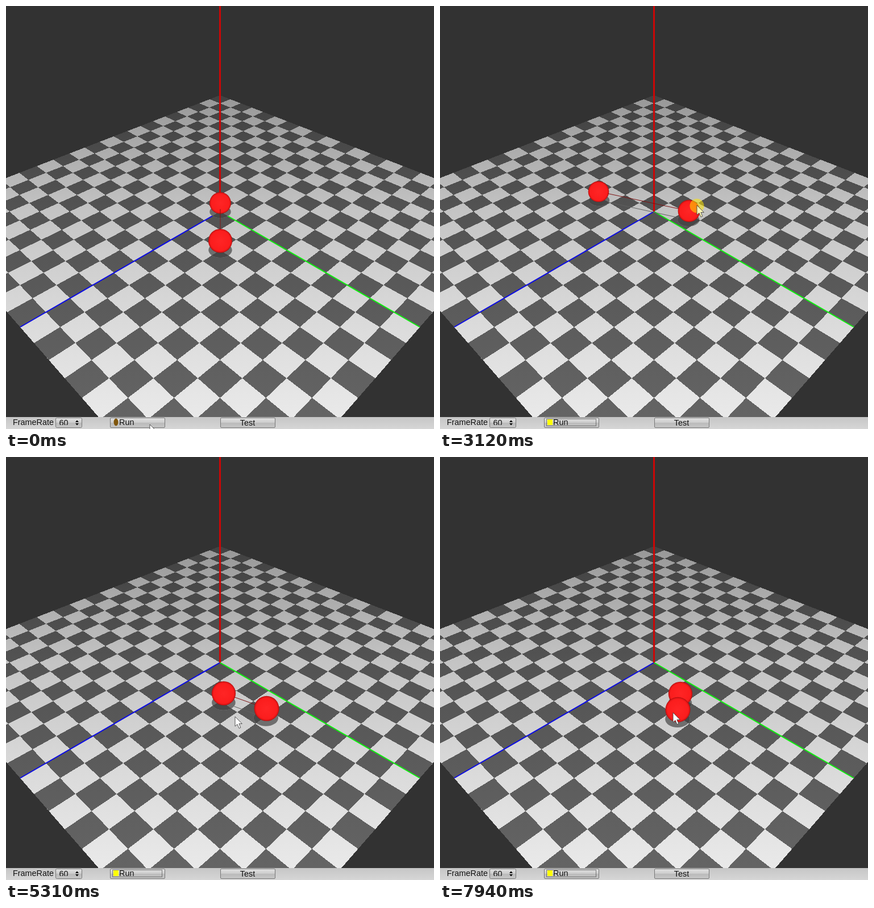
Animation, 753 px wide and 743 px high, one loop 8 s. Source, as an HTML page:

```html
<!DOCTYPE html>
<html lang="en">
<head>
<meta charset="utf-8">
<title>Spring simulation</title>
<style>
  html, body { margin: 0; width: 100%; height: 100%; overflow: hidden; background: #323232; }
  svg { display: block; width: 753px; height: 743px; }
  text { font: 14.4px "Liberation Sans", Arial, sans-serif; fill: #111; }
</style>
</head>
<body>
<svg viewBox="0 0 753 743">
  <defs>
    <linearGradient id="light" gradientUnits="userSpaceOnUse" x1="0" y1="157" x2="0" y2="720">
      <stop offset="0" stop-color="#979797"/><stop offset=".15" stop-color="#aaa"/>
      <stop offset=".36" stop-color="#c4c4c4"/><stop offset=".68" stop-color="#d9d9d9"/>
      <stop offset="1" stop-color="#e9e9e9"/>
    </linearGradient>
    <linearGradient id="dark" gradientUnits="userSpaceOnUse" x1="0" y1="157" x2="0" y2="720">
      <stop offset="0" stop-color="#424242"/><stop offset=".36" stop-color="#535353"/>
      <stop offset="1" stop-color="#646464"/>
    </linearGradient>
    <linearGradient id="bar" x1="0" y1="0" x2="0" y2="1">
      <stop offset="0" stop-color="#c6c6c6"/><stop offset="1" stop-color="#d6d6d6"/>
    </linearGradient>
    <linearGradient id="btn" x1="0" y1="0" x2="0" y2="1">
      <stop offset="0" stop-color="#e0e0e0"/><stop offset=".45" stop-color="#cfcfcf"/>
      <stop offset=".55" stop-color="#bababa"/><stop offset="1" stop-color="#c8c8c8"/>
    </linearGradient>
    <radialGradient id="red">
      <stop offset="0" stop-color="#ff2525"/><stop offset=".82" stop-color="#fb1d1d"/>
      <stop offset=".94" stop-color="#dd1616"/><stop offset="1" stop-color="#a00c0c"/>
    </radialGradient>
    <clipPath id="shade"><ellipse/><ellipse/></clipPath>
    <clipPath id="field"><rect x="88" y="724" width="45" height="12"/></clipPath>
  </defs>

  <rect width="753" height="743" fill="#323232"/>
  <g id="floor" shape-rendering="crispEdges">
    <path id="board" fill="url(#light)"/>
    <path id="squares" fill="url(#dark)"/>
  </g>
  <path id="axisZ" stroke="#0a0ae6" stroke-width="2"/>
  <path id="axisX" stroke="#0ef00e" stroke-width="2"/>
  <g clip-path="url(#shade)">
    <use href="#floor"/>
    <rect width="753" height="743" fill="#414141" opacity=".68"/>
  </g>
  <line id="rodShade" stroke="#606060"/>
  <path d="M376.500 0V361" stroke="#cc0606" stroke-width="3"/>
  <circle id="far" fill="url(#red)"/>
  <line id="rod" stroke="#7c1212"/>
  <circle id="near" fill="url(#red)"/>

  <rect y="722" width="753" height="21" fill="url(#bar)"/>
  <g fill="url(#btn)" stroke="#777">
    <rect x="87.5" y="723.5" width="46" height="17" rx="2"/>
    <rect x="183.5" y="723.5" width="96" height="17" rx="1.5"/>
    <rect x="377.5" y="723.5" width="96" height="17" rx="1.5"/>
  </g>
  <text x="12" y="736">FrameRate</text>
  <text x="93.5" y="737" clip-path="url(#field)">60</text>
  <path d="M122 731L125 727.500L128 731ZM122 733L125 736.500L128 733Z"/>
  <ellipse id="idle" cx="193.5" cy="731" rx="4" ry="6.5" fill="#80560c"/>
  <g id="active">
    <rect x="189" y="726" width="9" height="10" fill="#ff0"/>
    <rect x="187.5" y="725.5" width="87" height="12" fill="none" stroke="#222" stroke-dasharray="1 1"/>
  </g>
  <text x="199" y="736">Run</text>
  <text x="425" y="737" text-anchor="middle">Test</text>

  <circle id="grab" r="12.5" fill="#ffe600" opacity=".55"/>
  <path id="cursor" d="M0 0V17L4 13.500L7 20.500L9.800 19.300L6.900 12.500H12.300Z" stroke="#444" stroke-width=".9"/>
</svg>

<script>
const $ = id => document.getElementById(id);
const LOOP = 8000, CX = 376.5, CY = 361, FOCAL = 871.5, DIST = 23.3, R = 0.5;
const SIN = Math.sqrt(1 / 3), COS = Math.sqrt(2 / 3);
const START = 340, CATCH = 1890, SWING = 3120, FREE = 4050;

// v: right, u: towards the viewer, h: up
function project(v, u, h) {
  const s = FOCAL / (DIST - COS * u - SIN * h);
  return { x: CX + v * s, y: CY + (SIN * u - COS * h) * s, s };
}

// Ground position of a ball whose centre is seen at x, y
function locate([x, y]) {
  const dy = y - CY, depth = DIST - SIN * R;
  const u = (dy * depth + FOCAL * COS * R) / (FOCAL * SIN + COS * dy);
  return [(x - CX) * (depth - COS * u) / FOCAL, u];
}

const smooth = p => { p = Math.min(1, Math.max(0, p)); return p * p * (3 - 2 * p); };

// Eases from stop to stop; a stop is [time, x, y]
function glide(t, ...stops) {
  let [, x, y] = stops[0];
  for (let i = 1; i < stops.length; i++) {
    const [t0, x0, y0] = stops[i - 1], [t1, x1, y1] = stops[i];
    const p = smooth((t - t0) / (t1 - t0));
    x += (x1 - x0) * p;
    y += (y1 - y0) * p;
  }
  return [x, y];
}

// Screen position of the ball that follows the pointer
function dragged(t) {
  if (t < CATCH) return glide(t, [START, 377, 412.5], [CATCH, 374, 405]);
  if (t > SWING) return glide(t, [SWING, 438, 360], [3660, 363, 500], [FREE, 362.5, 465]);
  const p = (t - CATCH) / (SWING - CATCH);
  const a = (28.6 + 310.4 * p) * Math.PI / 180, grow = .457 + .543 * smooth(p * 3);
  return [326 + 120 * grow * Math.cos(a), 388 + 78 * grow * Math.sin(a)];
}

function pulled(t) {
  return glide(t, [START, 377, 346], [CATCH, 377, 376], [SWING, 279, 326], [3660, 507, 362], [FREE, 459, 385.5]);
}

function pointerAt(t) {
  if (t < CATCH) return glide(t, [400, 253, 735], [1120, 421, 430], [CATCH, 374, 398]);
  if (t > SWING) return glide(t, [SWING, 452, 350], [3660, 183, 587], [4200, 183, 587],
    [4540, 345, 561], [5310, 403, 456], [6770, 405, 434], [7940, 410, 449]);
  const [x, y] = dragged(t), p = (t - CATCH) / (SWING - CATCH);
  return [x + 14 * p, y - 7 - 3 * p];
}

// Free pair: the spring contracts exponentially and the spin follows 1 / length²
const REST = .88, STRETCH = 2.866, RATE = .768;
function turned(len) {
  return -(Math.log((len - REST) / len) / REST ** 2 + 1 / (REST * len)) / RATE;
}

function spin(s) {
  const len = REST + STRETCH * Math.exp(-RATE * s);
  const j = turned(len) - turned(REST + STRETCH);
  const a = (128.9 + j * (430 - 25.6 * j)) * Math.PI / 180;
  const v = 1.025 - .158 * Math.exp(-1.9 * s), u = 3.46 - .244 * Math.exp(-1.25 * s);
  const dv = Math.cos(a) * len / 2, du = Math.sin(a) * len / 2;
  return [[v - dv, u - du], [v + dv, u + du]];
}

function ballsAt(t) {
  return t < FREE ? [locate(pulled(t)), locate(dragged(t))] : spin((t - FREE) / 1000);
}

function set(el, attrs) {
  for (const k in attrs) el.setAttribute(k, attrs[k]);
}

function setLine(el, a, b) {
  set(el, { x1: a.x, y1: a.y, x2: b.x, y2: b.y });
}

function show(el, on) {
  set(el, { visibility: on ? "visible" : "hidden" });
}

function buildFloor() {
  const at = (i, j) => {
    const p = project((j - i) / Math.SQRT2, (i + j) / Math.SQRT2, 0);
    return p.x.toFixed(2) + " " + p.y.toFixed(2);
  };
  const quad = (i, j, n) => `M${at(i, j)}L${at(i + n, j)}L${at(i + n, j + n)}L${at(i, j + n)}Z`;
  let d = "";
  for (let i = -10; i < 10; i++)
    for (let j = -10; j < 10; j++)
      if ((i + j) % 2 === 0) d += quad(i, j, 1);
  set($("board"), { d: quad(-10, -10, 20) });
  set($("squares"), { d });
  set($("axisZ"), { d: `M${at(0, 0)}L${at(10, 0)}` });
  set($("axisX"), { d: `M${at(0, 0)}L${at(0, 10)}` });
}

const shadows = document.querySelectorAll("#shade ellipse");

function draw(t) {
  const [far, near] = ballsAt(t).sort((a, b) => a[1] - b[1]);
  [far, near].forEach((b, i) => {
    const p = project(...b, R), g = project(...b, 0);
    set($(i ? "near" : "far"), { cx: p.x, cy: p.y, r: p.s * R });
    set(shadows[i], { cx: g.x, cy: g.y, rx: g.s * R, ry: g.s * g.s * R * SIN * DIST / FOCAL });
  });

  const dv = near[0] - far[0], du = near[1] - far[1];
  const k = Math.min(.5, R / Math.hypot(dv, du));
  const start = [far[0] + dv * k, far[1] + du * k], end = [near[0] - dv * k, near[1] - du * k];
  setLine($("rod"), project(...start, R), project(...end, R));
  setLine($("rodShade"), project(...start, 0), project(...end, 0));

  const [x, y] = pointerAt(t), held = t >= 1500 && t < 3420;
  set($("cursor"), { transform: `translate(${x} ${y})`, fill: held ? "#fff8b8" : "#fff" });
  set($("grab"), { cx: x, cy: y + 1 });
  show($("grab"), held);
  show($("idle"), t < 420);
  show($("active"), t >= 420);
}

buildFloor();
const began = performance.now();
function tick() {
  draw((performance.now() - began) % LOOP);
  requestAnimationFrame(tick);
}
tick();
</script>
</body>
</html>
```
